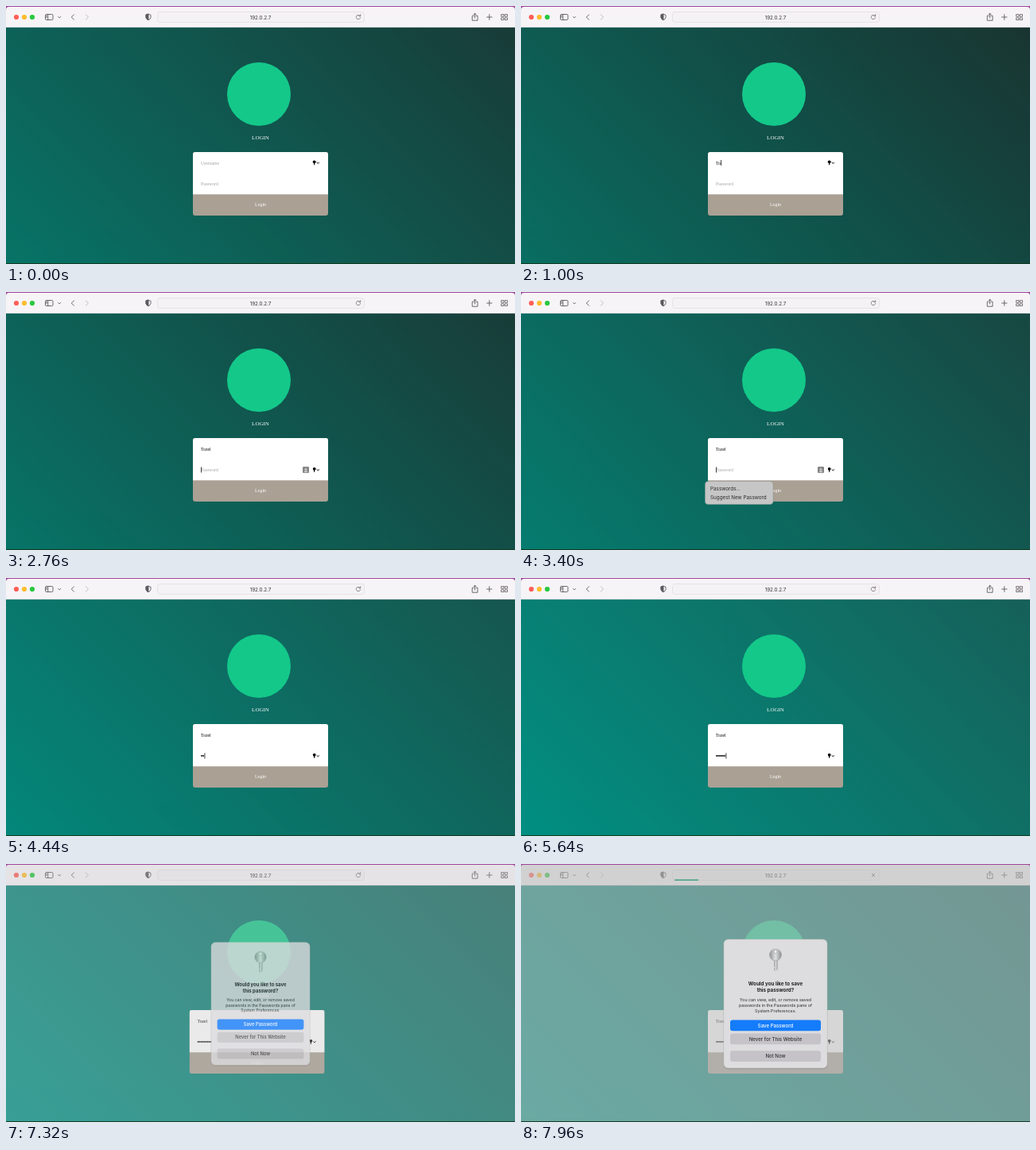
Write an HTML page that moves like this. It is 640 px wide and 325 px high and loops after 8 s.

```html
<!DOCTYPE html>
<html lang="en">
<head>
<meta charset="utf-8">
<title>Login</title>
<style>
  html, body { margin: 0; width: 100%; height: 100%; overflow: hidden; background: #0d5148; }
  svg { display: block; width: 100vw; height: 100vh; }
  text { font-family: Inter, "Open Sans", sans-serif; }
  .serif { font-family: "Liberation Serif", "Noto Serif", serif; font-size: 5.7px; }
  .mid { text-anchor: middle; }
  .line { fill: none; stroke: #5d5a5e; stroke-width: .9; stroke-linecap: round; stroke-linejoin: round; }
  .hint { fill: #a3a3a3; }
  .menu { font-size: 6.3px; fill: #2a2a2a; }
  .title { font-size: 6.3px; font-weight: 700; fill: #222; }
  .body { font-size: 5.3px; fill: #2c2c2c; }
  .button { font-size: 6.1px; font-weight: 500; fill: #333; }
  #dialog { transform-origin: 320px 176.5px; }
  #progress { transform-origin: 193px 20px; }
</style>
</head>
<body>
<svg viewBox="0 0 640 325" preserveAspectRatio="none">
  <defs>
    <linearGradient id="dark" gradientUnits="userSpaceOnUse" x1="86" y1="410" x2="555" y2="-59">
      <stop stop-color="#0a6b5f"/><stop offset="1" stop-color="#1a312e"/>
    </linearGradient>
    <linearGradient id="light" gradientUnits="userSpaceOnUse" x1="86" y1="410" x2="555" y2="-59">
      <stop stop-color="#009688"/><stop offset="1" stop-color="#166a61"/>
    </linearGradient>
    <linearGradient id="metal" x2="1">
      <stop stop-color="#8e9192"/><stop offset=".5" stop-color="#dfe1e1"/><stop offset="1" stop-color="#8a8d8e"/>
    </linearGradient>
    <g id="keyMenu">
      <circle cx="387.7" cy="-1.2" r="1.9"/>
      <path d="M387.7 0V2.8" stroke="#000" stroke-width="1.2"/>
      <path d="M390.7 -.6l1.6 1.5l1.6 -1.5" fill="none" stroke="#000" stroke-width="1"/>
    </g>
  </defs>

  <!-- page -->
  <rect y="26" width="640" height="298" fill="url(#dark)"/>
  <rect id="glow" y="26" width="640" height="298" fill="url(#light)"/>
  <rect y="324" width="640" height="1" fill="#123c20"/>
  <circle cx="318" cy="111" r="40" fill="#14c88a"/>
  <text class="serif mid" x="320" y="167.5" style="font-size:7px" fill="#fff">LOGIN</text>

  <g id="card">
    <rect x="235" y="184" width="170" height="80" rx="3" fill="#aaa094"/>
    <path d="M235 237.300V187a3 3 0 0 1 3-3H402a3 3 0 0 1 3 3V237.300z" fill="#fff"/>
    <text class="serif mid" x="320" y="252.300" style="font-size:5.9px" fill="#fff">Login</text>
    <text id="userHint" class="serif hint" x="245" y="199.500">Username</text>
    <text id="user" class="serif" x="245" y="199.500"></text>
    <text id="passHint" class="serif hint" x="245" y="226">Password</text>
    <g id="dots"></g>
    <rect id="caret" x="245" y="194" width=".8" height="7" fill="#111"/>
    <use id="userKey" href="#keyMenu" y="197.500"/>
    <use id="passKey" href="#keyMenu" y="224"/>
    <g id="suggest">
      <rect x="373" y="220" width="8" height="8" rx="1.300" fill="#858585"/>
      <path d="M377 221.500v3.500m-1.500-1.300l1.500 1.500l1.500-1.500M375 226.500h4" fill="none" stroke="#fff" stroke-width=".8"/>
    </g>
  </g>

  <g id="popup">
    <rect x="231.500" y="238.500" width="85.500" height="29" rx="4" fill="#c5c6c5" stroke="#8f9a96" stroke-width=".5"/>
    <text class="menu" x="238" y="249.800">Passwords...</text>
    <text class="menu" x="238" y="260.800">Suggest New Password</text>
  </g>

  <!-- browser toolbar -->
  <rect width="640" height="8" fill="#a2469b"/>
  <path d="M0 27V5a4 4 0 0 1 4-4H636a4 4 0 0 1 4 4V27z" fill="#f7f4f7"/>
  <path d="M0 26.700H640" stroke="#d3d0d3" stroke-width=".6"/>
  <circle cx="13" cy="14" r="3.100" fill="#ff5f57"/>
  <circle cx="23" cy="14" r="3.100" fill="#febc2e"/>
  <circle cx="33" cy="14" r="3.100" fill="#28c840"/>
  <g class="line">
    <rect x="49.500" y="10.500" width="9.500" height="7" rx="1.300"/>
    <path d="M52.800 10.500v7M50.600 12.500h1M50.600 14.200h1"/>
    <path d="M65.700 13.500l1.500 1.500l1.500-1.500M85.500 10.800l-3.200 3.200l3.200 3.200"/>
    <path d="M100.300 10.800l3.200 3.200l-3.200 3.200" stroke="#b9b6ba"/>
    <path d="M179 10.300l3 1v3.200q-.5 2.200-3 3.200q-2.500-1-3-3.200v-3.200z"/>
    <path d="M179 10.300v7.400q-2.500-1-3-3.200v-3.200z" fill="#5d5a5e"/>
    <rect x="190.500" y="7.500" width="260" height="13" rx="3" fill="#f5f2f5" stroke="#e0dde0" stroke-width=".7"/>
    <path d="M588 12.300h-1.800v5.900h6.800v-5.900h-1.800M589.600 15V9.300m-1.700 1.600l1.700-1.700l1.700 1.700"/>
    <path d="M604.500 14h6.500M607.750 10.700v6.600"/>
    <path d="M623 10.600h3v2.600h-3zM627.500 10.600h3v2.600h-3zM623 14.900h3v2.600h-3zM627.500 14.900h3v2.600h-3z" stroke-width=".8"/>
    <path id="reload" d="M445.300 12.500a2.700 2.700 0 1 0 .4 2M445.700 10.700v2h-2" stroke-width=".7"/>
    <path id="stop" d="M441.300 12.200l3.600 3.600m0-3.600l-3.600 3.600"/>
  </g>
  <text class="mid" x="320" y="16.600" font-size="6.300" fill="#333">192.0.2.7</text>

  <rect id="veil" y="1" width="640" height="323" fill="#b9b9b9"/>
  <rect id="progress" x="193" y="19.500" width="30" height="1.300" fill="#2c9a78"/>

  <!-- save prompt -->
  <g id="dialog">
    <rect x="254.500" y="95.500" width="131" height="163" rx="6" fill="#000" opacity=".12"/>
    <rect x="255" y="95" width="130" height="162" rx="5.500" fill="#dddcde" stroke="#c6c8c7" stroke-width=".5"/>
    <path d="M318.300 121h4.200v11.500l-2.100 3.500l-2.100-2.500v-2l1-1l-1-1.200z" fill="url(#metal)"/>
    <circle cx="320" cy="114.500" r="7.500" fill="url(#metal)" stroke="#9da1a1" stroke-width=".6"/>
    <circle cx="320" cy="110.500" r="2" fill="#f3f4f4" stroke="#8d9191" stroke-width=".5"/>
    <g class="mid">
      <text class="title" x="320" y="152.800">Would you like to save</text>
      <text class="title" x="320" y="160.800">this password?</text>
      <text class="body" x="320" y="172.800">You can view, edit, or remove saved</text>
      <text class="body" x="320" y="179.800">passwords in the Passwords pane of</text>
      <text class="body" x="320" y="186.800">System Preferences.</text>
      <rect x="263" y="196.500" width="114" height="13.700" rx="3" fill="#147cfb"/>
      <rect x="263" y="213.500" width="114" height="13.700" rx="3" fill="#c5c3c7"/>
      <rect x="263" y="235.200" width="114" height="13.700" rx="3" fill="#c5c3c7"/>
      <text class="button" x="320" y="205.500" style="fill:#fff">Save Password</text>
      <text class="button" x="320" y="222.500">Never for This Website</text>
      <text class="button" x="320" y="244.200">Not Now</text>
    </g>
  </g>
</svg>
<script>
  const LOOP = 8000, NAME = "Tozel", DOTS = 9;
  const FOCUS_PASSWORD = 2640, SUBMIT = 7120, LOADING = 7680;
  const nameAt = i => 700 + 240 * i;
  const dotAt = i => 4120 + 300 * i;
  const $ = id => document.getElementById(id);

  // stops: [ms, value] pairs, held at both ends of the loop
  function loop(el, prop, stops, easing = "linear") {
    const first = stops[0], last = stops[stops.length - 1];
    const all = [[0, first[1]], ...stops.filter(s => s[0] > 0 && s[0] < LOOP), [LOOP, last[1]]];
    const frames = all.map(([ms, value]) => ({ offset: ms / LOOP, [prop]: value, easing }));
    el.animate(frames, { duration: LOOP, iterations: Infinity }).startTime = start;
  }
  const start = document.timeline.currentTime || 0;
  const hold = (el, prop, stops) => loop(el, prop, stops, "steps(1, end)");
  const show = (el, from, to = LOOP) => hold(el, "visibility", [
    [0, from > 0 ? "hidden" : "visible"], [from, "visible"], [to, "hidden"]]);

  function svg(tag, parent, attrs = {}) {
    const el = document.createElementNS("http://www.w3.org/2000/svg", tag);
    for (const key in attrs) el.setAttribute(key, attrs[key]);
    return parent.appendChild(el);
  }

  // typing
  const caret = [];
  [...NAME].forEach((letter, i) => {
    const span = svg("tspan", $("user"));
    span.textContent = letter;
    show(span, nameAt(i));
    caret.push([nameAt(i), `translate(${$("user").getSubStringLength(0, i + 1) + .2}px, 0px)`]);
  });
  caret.push([FOCUS_PASSWORD, "translate(0px, 26.5px)"]);
  for (let i = 0; i < DOTS; i++) {
    show(svg("circle", $("dots"), { cx: 246 + 2 * i, cy: 224, r: .9 }), dotAt(i));
    caret.push([dotAt(i), `translate(${2 * i + 2.4}px, 26.5px)`]);
  }
  hold($("caret"), "transform", caret);
  show($("caret"), nameAt(0), SUBMIT);
  show($("userHint"), 0, nameAt(0));
  show($("passHint"), 0, dotAt(0));
  show($("userKey"), 0, FOCUS_PASSWORD);
  show($("passKey"), FOCUS_PASSWORD);
  show($("suggest"), FOCUS_PASSWORD, dotAt(0));
  show($("popup"), FOCUS_PASSWORD + 200, dotAt(0));

  // drifting background
  loop($("glow"), "opacity", [[0, .2], [900, .08], [1800, 0], [2400, .1], [3400, .4],
    [4440, .66], [5640, .85], [7320, .96], [8000, 1]]);

  // rejected login, then the save prompt
  const shift = x => `translate(${x}px, 0px)`;
  loop($("card"), "transform", [[7160, shift(0)], [7240, shift(4.5)], [7320, shift(-4.5)],
    [7400, shift(4.5)], [7480, shift(0)]]);
  loop($("veil"), "opacity", [[7160, 0], [7320, .3], [7520, .58]]);
  loop($("dialog"), "opacity", [[7160, 0], [7320, .78], [7480, 1]]);
  loop($("dialog"), "transform", [[7160, "scale(.88)"], [7320, "scale(.954)"], [7520, "scale(1)"]]);

  // page load
  show($("reload"), 0, LOADING);
  show($("stop"), LOADING);
  loop($("progress"), "transform", [[LOADING, "scaleX(0)"], [7960, "scaleX(1)"]]);
</script>
</body>
</html>
```
